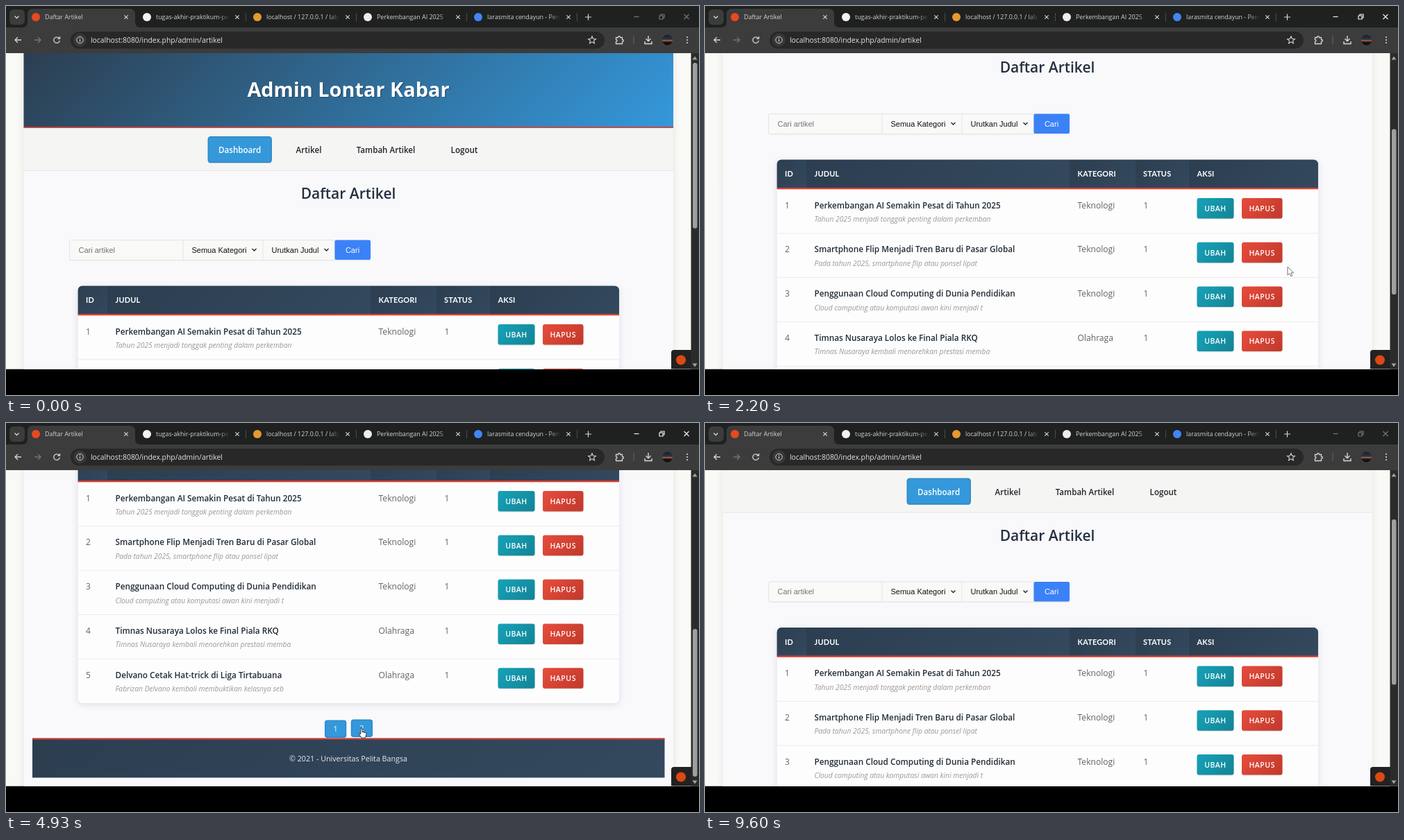
Recreate the animation shown at these times as an HTML page. Size 998 px wide and 561 px high, loop 9630 ms.

```html
<!DOCTYPE html>
<html lang="id">
<head>
<meta charset="utf-8">
<title>Daftar Artikel</title>
<style>
  html, body { margin: 0; width: 100%; height: 100%; overflow: hidden; background: #000; }
  svg { display: block; width: 100vw; height: 100vh; }
  text { font-family: "Open Sans", "Noto Sans", sans-serif; white-space: pre; }
  .form text { font-family: "Liberation Sans", Arial, sans-serif; }
  .heads text { font-family: Lato, "Open Sans", sans-serif; }
</style>
</head>
<body>
<svg id="stage" viewBox="0 0 998 561"></svg>
<script>
const LOOP = 9630;
const VIEW = 455;            // visible height of the page
const SPIN_H = 98.5;         // room the spinner takes
const ROW_H = 63.8;
const ROWS_TOP = 446;
const SHRINK = 252.5;        // how much shorter the second list is
const LOADS = [[4750, 5550], [6580, 7500]];

const stage = document.getElementById('stage');
let defs = '', gradId = 0;

const rect = (x, y, w, h, fill, more = '') =>
  `<rect x="${x}" y="${y}" width="${w}" height="${h}" fill="${fill}" ${more}/>`;
const text = (x, y, size, fill, str, more = '') =>
  `<text x="${x}" y="${y}" font-size="${size}" fill="${fill}" ${more}>${str}</text>`;
const line = (d, color, width = 1.2, more = '') =>
  `<path d="${d}" fill="none" stroke="${color}" stroke-width="${width}" ${more}/>`;
const dot = (x, y, r, fill) => `<circle cx="${x}" cy="${y}" r="${r}" fill="${fill}"/>`;
const group = (id, body, more = '') => `<g id="${id}" ${more}>${body}</g>`;
const BOLD = 'font-weight="600"';
const MID = 'text-anchor="middle"';

// Diagonal fill running at 135 degrees, as in CSS
function diagonal(x, y, w, h, from, to) {
  const id = 'g' + gradId++, cx = x + w / 2, cy = y + h / 2, r = (w + h) / 4;
  defs += `<linearGradient id="${id}" gradientUnits="userSpaceOnUse" x1="${cx - r}" y1="${cy - r}" x2="${cx + r}" y2="${cy + r}">` +
    `<stop stop-color="${from}"/><stop offset="1" stop-color="${to}"/></linearGradient>`;
  return `url(#${id})`;
}
const box = (x, y, w, h, from, to, more) => rect(x, y, w, h, diagonal(x, y, w, h, from, to), more);

// ---- browser frame ----
const close = (x, y, s, c) => line(`M${x - s} ${y - s}l${2 * s} ${2 * s}m0 ${-2 * s}l${-2 * s} ${2 * s}`, c, 1.1);

function tab(x, color, title) {
  return dot(x + 6, 16, 6, color) +
    text(x + 19, 19.2, 8.9, '#d3d3d3', title, 'clip-path="url(#tabClip' + x + ')"') +
    close(x + 136, 16, 2.7, '#d8d8d8');
}

function chrome() {
  const tabs = [
    [37, '#e8491f', 'Daftar Artikel'],
    [197, '#f2f2f2', 'tugas-akhir-praktikum-pemrograman'],
    [356, '#e59a2f', 'localhost / 127.0.0.1 / lab_web'],
    [515, '#ededed', 'Perkembangan AI 2025'],
    [674, '#4285f4', 'larasmita cendayun - Penelusuran']
  ];
  tabs.forEach(([x]) => defs += `<clipPath id="tabClip${x}">${rect(x + 17, 5, 107, 22, '#000')}</clipPath>`);
  const fades = tabs.slice(1).map(([x]) => rect(x + 108, 6, 17, 20, 'url(#tabFade)')).join('');
  const c = '#d6d6d6';
  return rect(0, 0, 998, 68, '#1f2020') +
    rect(5, 5, 22, 22, '#3b3c3c', 'rx="6"') + line('M12.5 14.5l3 3 3-3', c, 1.3) +
    '<path d="M23 31Q31 31 31 23V12Q31 4 39 4H178Q186 4 186 12V23Q186 31 194 31Z" fill="#3c3c3c"/>' +
    tabs.map(t => tab(...t)).join('') + fades +
    [345, 504, 663, 822].map(x => rect(x, 10, 1, 12, '#4b4b4b')).join('') +
    line('M834 16h9M838.500 11.500v9', c) +
    group('controls', line('M904.500 15.500h7') +
      line('M941 14h5v5h-5zM943 14v-2h5v5h-2') +
      line('M976.500 12l7 7m0-7l-7 7')) +
    rect(0, 31, 998, 37, '#3c3c3c') +
    line('M22 49h-9m4-4l-4 4 4 4', c, 1.3) +
    line('M41 49h9m-4-4l4 4-4 4', '#747474', 1.3) +
    line('M76.500 46.500A4.300 4.300 0 1 0 77.300 50M77.500 44v3.200h-3.200', c, 1.3) +
    rect(93, 37, 769, 24.5, '#282828', 'rx="12.2"') +
    dot(106.5, 49, 9.5, '#383838') +
    '<circle cx="106.500" cy="49" r="4.700" fill="none" stroke="#d6d6d6"/>' +
    line('M106.500 48.300v3.200M106.500 46v1.200', c) +
    text(122, 52.6, 10.35, '#e3e3e3', 'localhost:8080/index.php/admin/artikel') +
    line('M844 43.800l1.600 3.500 3.800.4-2.900 2.500.9 3.700-3.400-2-3.400 2 .9-3.700-2.900-2.500 3.800-.4z', c, 1.1) +
    line('M878.500 45.500h3q0-2 1.500-2t1.500 2h3v3q2 0 2 1.500t-2 1.500v3h-9v-3.300q1.600-.2 1.600-1.400t-1.600-1.400z', c, 1.3) +
    rect(903.5, 43, 1, 12, '#626262') +
    line('M925 43v7.500m-3.500-3.300l3.500 3.500 3.500-3.500M920 51v3.500h10V51', c, 1.4) +
    dot(952.5, 49, 7.5, 'url(#dusk)') +
    [45, 49, 53].map(y => dot(981, y, 1.1, c)).join('');
}

// ---- page ----
function formBar() {
  const arrow = x => line(`M${x} 350l3 3 3-3`, '#222', 1.3);
  return group('form',
    rect(91.5, 338.5, 434, 29, '#000', 'rx="3" opacity=".05"') +
    rect(91.5, 337.5, 382, 29, '#f9f9f8', 'rx="2" stroke="#e2e3e4"') +
    [255, 370].map(x => rect(x - 0.5, 338, 1, 28, '#e2e3e4')).join('') +
    rect(473.5, 337.5, 51.5, 28.5, '#3b82f6', 'rx="2"') +
    text(104.5, 355.5, 11, '#757575', 'Cari artikel') +
    text(267.5, 355.5, 11, '#111', 'Semua Kategori') + arrow(354.5) +
    text(382.5, 355.5, 11, '#111', 'Urutkan Judul') + arrow(458.5) +
    text(499, 355.5, 11, '#fff', 'Cari', MID), 'class="form"');
}

function button(x, y, w, label, from, to) {
  return rect(x, y + 1, w, 29.5, '#000', 'rx="3" opacity=".12"') +
    box(x, y, w, 29.5, from, to, 'rx="3"') +
    text(x + w / 2, y + 18.7, 10.5, '#fff', label, `${BOLD} ${MID} letter-spacing=".55"`);
}

function table(id, cols, rows) {
  const [judul, kat, status, aksi] = cols;
  const h = rows.length * ROW_H;
  const edges = [103.5, ...cols.map(x => Math.round(x - 11.5)), 883];
  const head = rect(103.5, 403.5, 779.5, 42, '#30445a') + edges.slice(0, 5).map((x, i) =>
    box(x, 403.5, edges[i + 1] - x, 41.5, '#2c3e50', '#34495e')).join('');
  const labels = ['ID', 'JUDUL', 'KATEGORI', 'STATUS', 'AKSI'].map((s, i) =>
    text([115, ...cols][i], 428.3, 10.9, '#fff', s, 'font-weight="700" letter-spacing=".2"')).join('');
  const body = rows.map(([no, title, lead, kind, state], i) => {
    const y = ROWS_TOP + i * ROW_H;
    return rect(103.5, y, 779.5, ROW_H, '#f3f4f8', 'class="hover" opacity="0"') +
      (i ? rect(103.5, y - 0.5, 779.5, 1, '#ececee') : '') +
      text(115, y + 27.5, 12, '#5f6368', no) +
      text(judul, y + 27.5, 11.78, '#212b36', title, BOLD) +
      text(judul, y + 47, 10.27, '#999', lead, 'font-style="italic"') +
      text(kat, y + 27.5, 12.1, '#5f6368', kind) +
      text(status + 0.5, y + 27.5, 12, '#5f6368', state) +
      button(aksi, y + 13, 53, 'UBAH', '#17a2b8', '#138496') +
      button(aksi + 64.5, y + 13, 58.5, 'HAPUS', '#e74c3c', '#c0392b');
  }).join('');
  defs += `<clipPath id="${id}Clip">${rect(103.5, 403.5, 779.5, 42.5 + h, '#000', 'rx="7"')}</clipPath>`;
  return group(id, rect(103.5, 406, 779.5, 42 + h, '#38455a', 'rx="7" opacity=".15" filter="url(#soft)"') +
    `<g clip-path="url(#${id}Clip)">` + rect(103.5, 403.5, 779.5, 42.5 + h, '#fdfdfd') +
    body + head + `<g class="heads">${labels}</g>` + rect(103.5, 444, 779.5, 2.3, '#d9402f') + '</g>');
}

function pager(n, x) {
  return group('page' + n, rect(x + 0.7, 790.2, 29.8, 24, '#fff', 'rx="3" stroke="#3498db" stroke-width="1.500"') +
    text(x + 15.6, 806.2, 10.8, '#3498db', n, `font-weight="500" ${MID}`));
}

function page() {
  const navItem = (x, s) => text(x, 212, 11.6, '#212529', s, `${BOLD} ${MID}`);
  const brand = (x, y, fill, more) => text(x, y, 28.9, fill, 'Admin Lontar Kabar', `font-weight="700" ${MID} ${more}`);
  const first = [
    ['1', 'Perkembangan AI Semakin Pesat di Tahun 2025', 'Tahun 2025 menjadi tonggak penting dalam perkemban', 'Teknologi', '1'],
    ['2', 'Smartphone Flip Menjadi Tren Baru di Pasar Global', 'Pada tahun 2025, smartphone flip atau ponsel lipat', 'Teknologi', '1'],
    ['3', 'Penggunaan Cloud Computing di Dunia Pendidikan', 'Cloud computing atau komputasi awan kini menjadi t', 'Teknologi', '1'],
    ['4', 'Timnas Nusaraya Lolos ke Final Piala RKQ', 'Timnas Nusaraya kembali menorehkan prestasi memba', 'Olahraga', '1'],
    ['5', 'Delvano Cetak Hat-trick di Liga Tirtabuana', 'Fabrizan Delvano kembali membuktikan kelasnya seb', 'Olahraga', '1']
  ];
  const second = [['16', 'Larasmita Cendayun: Kebanggaan Voli Indonesia di Liga Dwira',
    'Larasmita Cendayun Pramesa, atau yang akrab dijulu', 'Olahraga', '0']];
  return rect(25.5, 0, 935.5, 1100, '#4a5568', 'opacity=".13" filter="url(#soft)"') +
    rect(25.5, 0, 935.5, 1100, '#f9f9fc') +
    box(25.5, 68, 935.5, 107, '#2c3e50', '#3498db') +
    rect(25.5, 174.2, 935.5, 2, '#d0443a') +
    brand(494.3, 132.3, '#000', 'opacity=".3"') + brand(493, 131, '#fff', '') +
    rect(25.5, 176.2, 935.5, 61.3, '#f5f5f3') + rect(25.5, 237, 935.5, 1, '#e5e7eb') +
    rect(291.2, 188.7, 91, 37, '#3498db', 'rx="3.500" stroke="#2980b9" stroke-width="1.300"') +
    text(336.7, 212, 11.6, '#fff', 'Dashboard', `${BOLD} ${MID}`) +
    navItem(436, 'Artikel') + navItem(547, 'Tambah Artikel') + navItem(660, 'Logout') +
    text(493, 278, 21, '#25303f', 'Daftar Artikel', `${BOLD} ${MID}`) +
    formBar() +
    group('spinner', '<circle r="14.500" fill="none" stroke="#f2f2f0" stroke-width="3"/>' +
      line('M-10.250-10.250A14.500 14.500 0 0 1 10.250-10.250', '#3498db', 3)) +
    group('list',
      table('first', [157.5, 536.5, 631, 708.5], first) +
      table('second', [155.3, 567.5, 654, 724.5], second) +
      group('tail', pager(1, 459) + pager(2, 496.8) +
        box(38, 816, 910.5, 56.5, '#2c3e50', '#34495e') +
        rect(38, 815.3, 910.5, 2.2, '#cf4038') +
        text(493, 849, 10.7, '#e8ecef', '© 2021 - Universitas Pelita Bangsa', MID)));
}

function build() {
  const body = rect(0, 0, 998, 561, '#000') +
    '<g clip-path="url(#view)">' + rect(0, 68, 998, VIEW + 1, '#f9f9f5') + group('page', page()) +
    '<path d="M958 523.500V500q0-4 4-4h25v27.500z" fill="#222"/>' + dot(972, 510.5, 7, '#dd4814') +
    rect(986.5, 68, 12, VIEW + 1, '#2b2b2b') +
    rect(989, 82, 6.5, 10, '#9f9f9f', 'id="thumb" rx="3.200"') +
    '<path d="M988.500 77.500h7l-3.500-5zM988.500 515.500h7l-3.500 5z" fill="#9f9f9f"/></g>' +
    chrome() +
    '<g clip-path="url(#screen)">' +
    group('arrow', '<path d="M0 0V12.200L2.900 9.600 4.800 13.800 6.700 13 4.900 8.900H8.700Z" fill="#fff" stroke="#555" stroke-width=".8"/>') +
    group('hand', '<path d="M-1.200 1q0-1 1.100-1t1.100 1v4.500l4.700 1q1.300.3 1.300 1.600l-.8 3.600-1.200 2.500H.2L-4 8.500q.6-1.500 2.800 0z" fill="#fff" stroke="#222" stroke-width=".9"/>') + '</g>';
  defs += '<filter id="soft" x="-10%" y="-30%" width="120%" height="160%"><feGaussianBlur stdDeviation="5"/></filter>' +
    `<clipPath id="view">${rect(0, 68, 998, VIEW + 0.7, '#000')}</clipPath>` +
    `<clipPath id="screen">${rect(0, 0, 998, 523.7, '#000')}</clipPath>` +
    '<linearGradient id="tabFade"><stop stop-color="#1f2020" stop-opacity="0"/><stop offset="1" stop-color="#1f2020"/></linearGradient>' +
    '<linearGradient id="dusk" x2="0" y2="1"><stop stop-color="#15202e"/><stop offset=".45" stop-color="#27364a"/>' +
    '<stop offset=".55" stop-color="#c4622d"/><stop offset=".7" stop-color="#15171c"/><stop offset="1" stop-color="#0c0d10"/></linearGradient>';
  stage.innerHTML = `<defs>${defs}</defs>` + body;
}

build();
const el = id => document.getElementById(id);
const hovers = el('first').querySelectorAll('.hover');

// ---- motion ----
const clamp = v => Math.max(0, Math.min(1, v));
const smooth = v => v * v * (3 - 2 * v);
const easeOut = v => 1 - (1 - v) ** 3;
const within = (t, [a, b]) => t >= a && t < b;
const fade = (t, a, b) => clamp((t - a) / 250) * clamp(1 - (t - b) / 250);

// Cursor moves: start, end, x, y reached
const MOVES = [[650, 1250, 839, 376], [3200, 4300, 512, 440], [5750, 6300, 471, 440], [7900, 8500, 560, 540]];
const ROW_HOVERS = [[1, 2400, 2950], [4, 2950, 3500], [1, 7500, 8250]];

function cursorAt(t) {
  let x = 880, y = 530;
  for (const [a, b, tx, ty] of MOVES) {
    const k = smooth(clamp((t - a) / (b - a)));
    x += (tx - x) * k;
    y += (ty - y) * k;
  }
  return [x, y];
}

function scrollAt(t, loading) {
  if (t >= LOADS[0][1]) return 108.5;
  const s = 182 * easeOut(clamp((t - 1750) / 400)) + 179 * easeOut(clamp((t - 2350) / 400));
  return s + (loading ? SPIN_H : 0);
}

const show = (id, on) => el(id).setAttribute('display', on ? 'inline' : 'none');
const move = (id, x, y, more = '') => el(id).setAttribute('transform', `translate(${x} ${y})${more}`);

function paintPager(n, active, over) {
  const [frame, label] = el('page' + n).children, full = active || over;
  frame.setAttribute('fill', full ? '#3498db' : '#fff');
  frame.setAttribute('stroke', full ? '#2b8aca' : '#3498db');
  label.setAttribute('fill', full ? '#fff' : '#3498db');
  move('page' + n, 0, over ? -1 : 0);
}

function render(t) {
  const load = LOADS.find(l => within(t, l));
  const onSecond = within(t, [LOADS[0][1], LOADS[1][1]]);
  const scroll = scrollAt(t, load), gap = load ? SPIN_H : 0, cut = onSecond ? SHRINK : 0;

  move('page', 0, -scroll);
  move('list', 0, gap);
  move('tail', 0, -cut);
  show('first', !onSecond);
  show('second', onSecond);
  show('spinner', load);
  if (load) move('spinner', 494, 444, ` rotate(${(t - load[0]) * 0.36})`);

  const total = VIEW + 361 + gap - cut, track = 428;
  el('thumb').setAttribute('y', 82 + track * scroll / total);
  el('thumb').setAttribute('height', track * VIEW / total);

  const [x, y] = cursorAt(t), top = 790 - cut + gap - scroll;
  const inPager = y > top && y < top + 25;
  const over = [459, 497].map(left => inPager && x > left && x < left + 31);
  paintPager(1, !onSecond, over[0]);
  paintPager(2, onSecond, over[1]);

  const hand = over[0] || over[1];
  show('hand', hand);
  show('arrow', !hand);
  move(hand ? 'hand' : 'arrow', x, y);

  hovers.forEach((row, i) => row.setAttribute('opacity',
    Math.max(0, ...ROW_HOVERS.filter(h => h[0] === i).map(h => fade(t, h[1], h[2])))));

  const color = within(t, [600, 8500]) ? '#f0f0f0' : '#757575';
  for (const p of el('controls').children) p.setAttribute('stroke', color);
}

const start = performance.now();
function tick() {
  render((performance.now() - start) % LOOP);
  requestAnimationFrame(tick);
}
tick();
</script>
</body>
</html>
```
